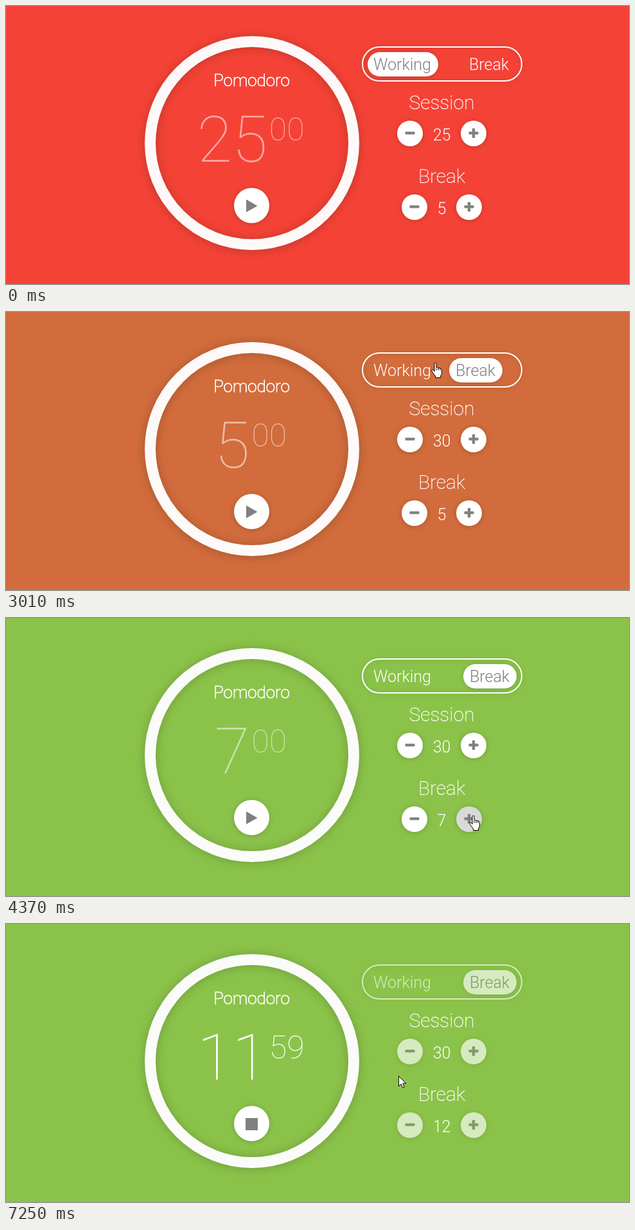
Write an HTML page with a canvas that moves like this. It is 970 by 434 pixels and loops after 8000 ms.

```html
<!DOCTYPE html>
<html lang="en">
<head>
<meta charset="utf-8">
<title>Pomodoro timer</title>
<style>
html, body { margin: 0; width: 100%; height: 100%; overflow: hidden; background: #f44336; }
canvas { display: block; }
</style>
</head>
<body>
<canvas id="stage" width="970" height="434"></canvas>
<script>
const ctx = document.getElementById('stage').getContext('2d', { alpha: false });
const LOOP = 8000, TOGGLE = 2935, START = 6250, TICK = 7250;
const RED = [244, 67, 54], GREEN = [139, 195, 74];
const WHITE = [255, 255, 255], GREY = [128, 128, 128], PRESSED = [217, 217, 217];
const RING = { x: 383, y: 214 }, PLAY = { x: 382.5, y: 311.5 };
const PANEL_X = 678.5, SESSION_Y = 199, BREAK_Y = 314;

const ARROW = new Path2D('M.5 .5V16.2L4.2 12.8L6.8 18.5L9.3 17.4L6.8 11.8H11.8Z');
const HAND = new Path2D('M5 14V2Q5 .5 6.5 .5Q8 .5 8 2V7.5Q10 6.8 11 8.5Q16.5 8 16.5 12V16Q16.3 19 14.5 20.5V23.5H6.5V21Q3 17 1 13.2Q.6 11 2.5 11Q4 11.5 5 14Z');

const clamp = (v, max = 1) => Math.min(max, Math.max(0, v));
const lerp = (a, b, p) => a + (b - a) * p;
const mix = (a, b, p) => a.map((v, i) => lerp(v, b[i], p));
const rgb = (c, a = 1) => `rgba(${c.map(Math.round).join()},${a})`;

// Number of clicks made by time t, at a steady pace
const clicks = (t, first, every, total) => clamp(Math.floor((t - first) / every) + 1, total);
const sessionLength = t => 25 + (t >= 1250) + clicks(t, 1820, 95, 4);
const breakLength = t => 5 + 2 * (t >= 4370) + clicks(t, 4550, 80, 5);

// CSS "ease" curve, solved for x by bisection
function ease(x) {
  x = clamp(x);
  const bezier = (s, a, b) => 3 * s * (1 - s) ** 2 * a + 3 * s * s * (1 - s) * b + s ** 3;
  let lo = 0, hi = 1;
  for (let i = 0; i < 20; i++) {
    const mid = (lo + hi) / 2;
    if (bezier(mid, .25, .25) < x) lo = mid; else hi = mid;
  }
  return bezier(lo, .1, 1);
}

function shadow(alpha, blur, dy = 0) {
  ctx.shadowColor = `rgba(0,0,0,${alpha})`;
  ctx.shadowBlur = blur;
  ctx.shadowOffsetY = dy;
}
const noShadow = () => shadow(0, 0);

function text(str, x, y, size, weight, color, align = 'center') {
  ctx.font = `${weight} ${size}px Roboto, sans-serif`;
  ctx.textAlign = align;
  ctx.fillStyle = color;
  ctx.fillText(str, x, y);
}

function heading(str, x, y, size, boldness) {
  text(str, x, y, size, 100, '#fff');
  ctx.strokeStyle = '#fff';
  ctx.lineWidth = boldness;
  ctx.strokeText(str, x, y);
}

function disc(x, y, r, color, alpha = 1) {
  shadow(.2 * alpha, 8, 1);
  ctx.fillStyle = color;
  ctx.beginPath();
  ctx.arc(x, y, r, 0, 7);
  ctx.fill();
  noShadow();
}

function box(x, y, w, h, r) {
  ctx.beginPath();
  ctx.roundRect(x, y, w, h, r);
}

function roundButton(x, y, sign, face, bg, alpha) {
  disc(x, y, 20, rgb(mix(bg, face, alpha)), alpha);
  ctx.fillStyle = rgb(mix(bg, GREY, alpha));
  box(x - 7.5, y - 2.8, 15, 4.4, 1);
  ctx.fill();
  if (sign === '+') {
    box(x - 2.2, y - 8, 4.4, 15, 1);
    ctx.fill();
  }
}

const buttonReach = value => value > 9 ? 49.5 : 42.5;

function counter(label, value, y, pressed, bg, alpha) {
  const reach = buttonReach(value);
  heading(label, PANEL_X, y - 38, 30, .35);
  text(value, PANEL_X, y + 11, 25, 300, '#fff');
  roundButton(PANEL_X - reach, y, '-', WHITE, bg, alpha);
  roundButton(PANEL_X + reach, y, '+', pressed ? PRESSED : WHITE, bg, alpha);
}

function ring() {
  shadow(.22, 16, 1);
  ctx.strokeStyle = 'rgba(255,255,255,.97)';
  ctx.lineWidth = 17;
  ctx.beginPath();
  ctx.arc(RING.x, RING.y, 158.5, 0, 7);
  ctx.stroke();
  noShadow();
}

function clock(minutes, seconds, alpha) {
  const color = rgb(WHITE, alpha), gap = 3;
  ctx.font = '100 100px Roboto, sans-serif';
  const big = ctx.measureText(minutes).width;
  // The two small digits together are as wide as one large digit
  const small = ctx.measureText('0').width;
  const left = PLAY.x - (big + small) / 2;
  text(minutes, left - gap, 243, 100, 100, color, 'left');
  text(seconds, left + big, 210, 50, 100, color, 'left');
}

function playButton(running) {
  const { x, y } = PLAY;
  disc(x, y, 27.5, '#fff');
  ctx.fillStyle = rgb(GREY);
  ctx.beginPath();
  if (running) ctx.rect(x - 9.5, y - 8.5, 19, 19);
  else {
    ctx.moveTo(x - 8.5, y - 9.5);
    ctx.lineTo(x + 9, y + .5);
    ctx.lineTo(x - 8.5, y + 10.5);
  }
  ctx.fill();
}

function modeSwitch(t, bg, alpha) {
  const onBreak = t >= TOGGLE;
  const white = rgb(mix(bg, WHITE, alpha)), grey = rgb(mix(bg, GREY, alpha));
  ctx.strokeStyle = white;
  ctx.lineWidth = 2;
  shadow(.18 * alpha, 9, 1);
  box(555, 64, 248, 53, 26.5);
  ctx.stroke();

  const x = onBreak ? lerp(678, 712, clamp((t - TOGGLE) / 215)) : 563;
  ctx.fillStyle = white;
  shadow(.15 * alpha, 7, 1);
  box(x, 72, onBreak ? 83 : 110, 38, 19);
  ctx.fill();
  noShadow();

  text('Working', 572, 100, 25, 300, onBreak ? white : grey, 'left');
  text('Break', onBreak ? x + 10 : 721, 100, 25, 300, onBreak ? grey : white, 'left');
}

// Each move glides from the last resting point to x, y, optionally curving past a bend
const move = (from, until, x, y, bend) => ({ from, until, x, y, bend });
const MOVES = [
  move(390, 1010, 730, 207, { x: 900, y: 260 }),
  move(2170, 2470, 615, 80),
  move(TOGGLE, 3150, 803, 217, { x: 680, y: 40 }),
  move(3150, 3700, 727, 308),
  move(5160, 5780, 664, 290, { x: 697, y: 266 }),
  move(5780, 6050, 388, 318),
  move(6440, 6870, 611, 237, { x: 545, y: 310 })
];

function pointerAt(t) {
  let at = { x: 927, y: 382 };
  for (const to of MOVES) {
    if (t < to.from) break;
    const p = clamp((t - to.from) / (to.until - to.from));
    const bend = to.bend || { x: (at.x + to.x) / 2, y: (at.y + to.y) / 2 };
    const curve = axis => lerp(lerp(at[axis], bend[axis], p), lerp(bend[axis], to[axis], p), p);
    at = { x: Math.round(curve('x')), y: Math.round(curve('y')) };
  }
  return at;
}

function pointer(t, session, rest) {
  if (t < MOVES[0].from) return;
  const { x, y } = pointerAt(t);
  const near = (cx, cy, r) => Math.hypot(x - cx, y - cy) < r;
  const overSwitch = x > 554 && x < 804 && y > 63 && y < 118;
  const hand = overSwitch || near(PLAY.x, PLAY.y, 27.5) ||
    near(PANEL_X + buttonReach(session), SESSION_Y, 20) ||
    near(PANEL_X + buttonReach(rest), BREAK_Y, 20);
  ctx.save();
  ctx.translate(hand ? x - 6 : x, y);
  ctx.lineWidth = 1;
  ctx.lineJoin = 'round';
  ctx.fillStyle = '#fff';
  ctx.strokeStyle = '#000';
  const shape = hand ? HAND : ARROW;
  ctx.fill(shape);
  ctx.stroke(shape);
  if (hand) {
    ctx.beginPath();
    for (let knuckle = 8; knuckle < 15; knuckle += 3) {
      ctx.moveTo(knuckle, 8.5);
      ctx.lineTo(knuckle, 12);
    }
    ctx.stroke();
  }
  ctx.restore();
}

function draw(t) {
  const bg = mix(RED, GREEN, ease((t - TOGGLE) / 360));
  const started = ease((t - START) / 250);
  const controls = lerp(1, .65, started);
  const session = sessionLength(t), rest = breakLength(t);
  const ticked = t >= TICK;

  ctx.fillStyle = rgb(bg);
  ctx.fillRect(0, 0, 970, 434);
  ring();
  heading('Pomodoro', PLAY.x, 125, 26, .9);

  const minutes = (t < TOGGLE ? session : rest) - ticked;
  clock(String(minutes), ticked ? '59' : '00', lerp(.55, 1, started));
  playButton(t >= START);

  modeSwitch(t, bg, controls);
  counter('Session', session, SESSION_Y, t >= 1170 && t < 2170, bg, controls);
  counter('Break', rest, BREAK_Y, t >= 4370 && t < 4940, bg, controls);
  pointer(t, session, rest);
}

const origin = performance.now();
function tick() {
  draw((performance.now() - origin) % LOOP);
  requestAnimationFrame(tick);
}
tick();
</script>
</body>
</html>
```
